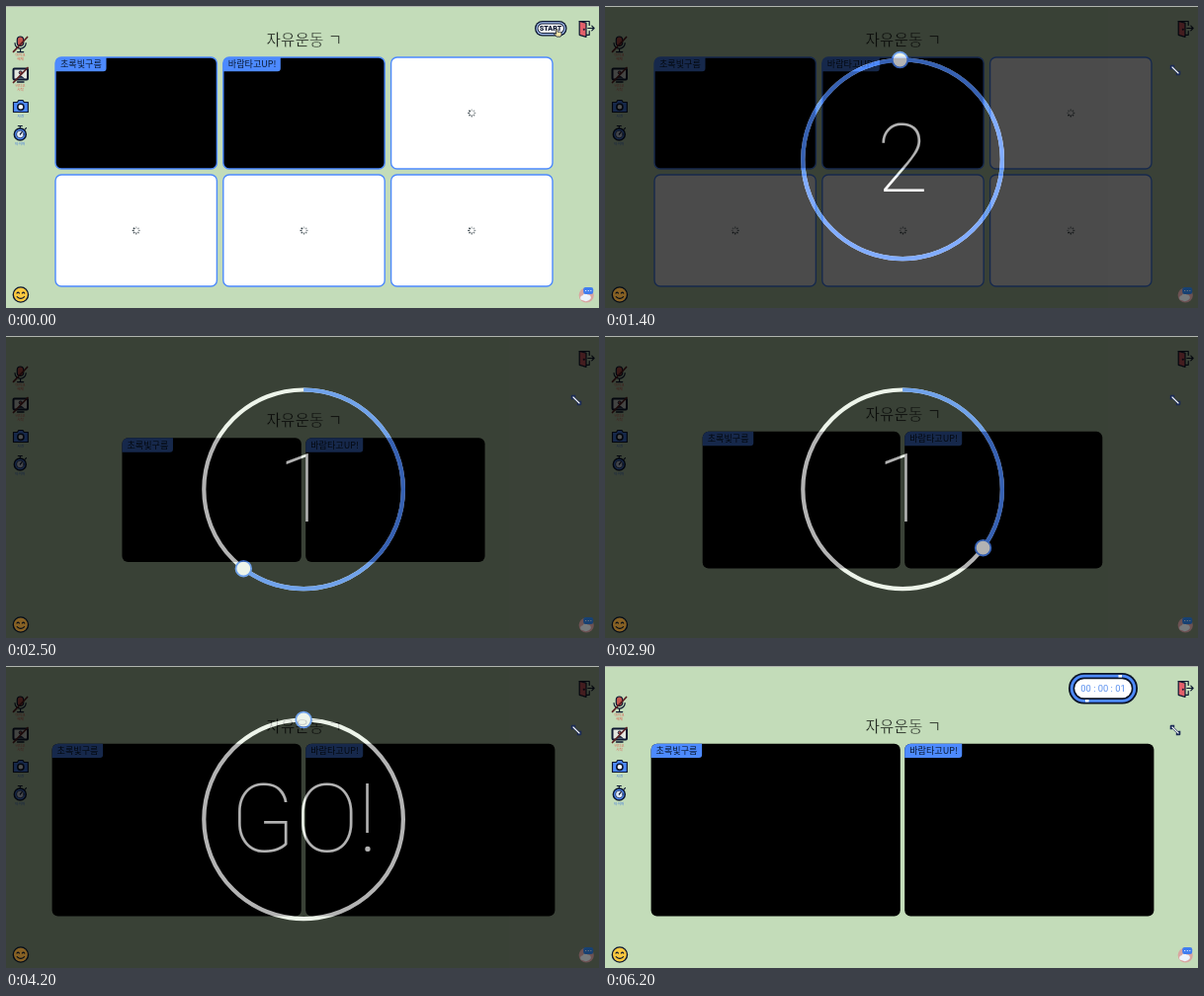
Animation, 600 px wide and 306 px high, one loop 6.3 s. Source, as an HTML page:

```html
<!DOCTYPE html>
<html lang="ko">
<head>
<meta charset="utf-8">
<title>자유운동</title>
<style>
  html, body { margin: 0; width: 100%; height: 100%; overflow: hidden; background: #c3dcb9; }
  svg { display: block; width: 100vw; height: 100vh; }
  text { font-family: "Noto Sans CJK KR", "Noto Sans KR", "Noto Sans CJK", sans-serif; }
  /* the background-coloured outline thins the strokes */
  #title { font-size: 15.7px; font-weight: 300; fill: #141a14; stroke: #c3dcb9; stroke-width: .4; }
  .tag { font-size: 9.1px; fill: #0a1a33; }
  .cap { font-size: 3.6px; text-anchor: middle; }
  #count { font: 100 95.5px Roboto, Inter, sans-serif; text-anchor: middle; fill: #fff; stroke: #fff; stroke-width: .15; }
  #clock { font: 400 9.4px Roboto, Inter, sans-serif; text-anchor: middle; fill: #5a90ee; }
  .start { font: 900 7.2px Roboto, Inter, sans-serif; text-anchor: middle; fill: #0c1730; }
  .ink { stroke: #0c1730; stroke-width: 1.2; stroke-linecap: round; stroke-linejoin: round; }
</style>
</head>
<body>
<svg viewBox="0 0 600 306" preserveAspectRatio="none">
  <rect width="600" height="306" fill="#c3dcb9"/>

  <g id="empty"></g>
  <g id="panels"></g>
  <text id="title" x="263.6">자유운동 ㄱ</text>

  <!-- side tools -->
  <g class="ink" fill="none">
    <rect x="11.3" y="31" width="6.4" height="9.5" rx="3.2" fill="#c4574f"/>
    <path d="M9 37.5a5.6 5.6 0 0 0 11.2 0M14.6 43.2V46.4M11.5 46.6H17.7"/>
    <path d="M7.5 46.3L21.6 31.5" stroke="#5a1f22" stroke-width="1.7"/>

    <rect x="7.5" y="63.5" width="14.5" height="11" rx="1" fill="#e3e6df" stroke-width="2"/>
    <path d="M11.5 77H18" stroke-width="1.4"/>
    <circle cx="14.8" cy="67.5" r="1.6" fill="#b3524b" stroke-width=".9"/>
    <path d="M11.5 73.5q3.3-5 6.6 0" fill="#33405f" stroke-width=".9"/>
    <path d="M7.5 77.5L22 62.5" stroke="#5a1f22" stroke-width="1.7"/>

    <path d="M7.5 97.5H11.5L12.8 95.5H17L18.3 97.5H22.3V107.5H7.5Z" fill="#4d8aff"/>
    <circle cx="14.9" cy="102.3" r="3.1" fill="#fff" stroke-width="1.6"/>

    <circle cx="14.3" cy="130" r="6" fill="#4d8aff" stroke-width="1.5"/>
    <circle cx="14.3" cy="130" r="3.7" fill="#dfeaff" stroke-width=".7"/>
    <path d="M14.3 130L16.3 127.6M14.3 123.6V121.8M12.3 121.5H16.3M19.3 124.8L20.5 123.6"/>
  </g>
  <g fill="#dd5d50">
    <text class="cap" x="14.5" y="51.2">마이크</text>
    <text class="cap" x="14.5" y="55.2">해제</text>
    <text class="cap" x="14.5" y="82">비디오</text>
    <text class="cap" x="14.5" y="86.3">시작</text>
  </g>
  <g fill="#3f78e0">
    <text class="cap" x="14.9" y="113">사진</text>
    <text class="cap" x="14.3" y="140.6">타이머</text>
  </g>

  <!-- exit door -->
  <g class="ink" fill="none">
    <path d="M580.2 15.5H590.2V19.5M590.2 25.5V29.3H586"/>
    <path d="M580.2 15.5L587 17.2V31.3L580.2 29.3Z" fill="#e2606a"/>
    <path d="M588.8 22.5H595M592.8 20.2L595.1 22.5L592.8 24.8"/>
    <circle cx="584.8" cy="23.8" r=".4"/>
  </g>

  <g id="start">
    <rect x="535" y="15" width="32.5" height="15.5" rx="7.7" fill="#0c1730"/>
    <rect x="536.3" y="16.3" width="29.9" height="12.9" rx="6.4" fill="#a9c4f5"/>
    <rect x="537.6" y="17.6" width="27.3" height="10.3" rx="5.1" fill="#0c1730"/>
    <rect x="538.5" y="18.5" width="25.5" height="8.5" rx="4.2" fill="#fff"/>
    <text class="start" x="551" y="25.4">START</text>
    <path class="ink" style="stroke-width:.8" fill="#f4e6a8"
      d="M556.4 23.6q.9-.9 1.7 0V26.2q2.8-.5 4 .9 .5 2.4-1 4H557.2L554.4 28q.2-1.2 2 0Z"/>
  </g>

  <g id="timer">
    <rect x="469" y="7" width="70" height="31.5" rx="15.7" fill="#0b1428"/>
    <rect x="472.2" y="10.2" width="63.6" height="25.1" rx="12.5" fill="none" stroke="#4d8aff" stroke-width="2.8"/>
    <rect x="475.2" y="13.2" width="57.6" height="19.1" rx="9.5" fill="#fff"/>
    <path d="M519.5 10.2H523M486 35.3H489.5" stroke="#fff" stroke-width="2.6"/>
    <text id="clock" x="504" y="25.6"></text>
  </g>

  <g id="overlay" opacity=".7">
    <rect width="600" height="306"/>
    <g fill="none" stroke-width="4.2">
      <circle cx="301.1" cy="155.3" r="100.8" stroke="#fff"/>
      <circle id="arc" cx="301.1" cy="155.3" r="100.8" stroke="#4d8aff" pathLength="360" transform="rotate(-90 301.1 155.3)"/>
    </g>
    <circle id="knob" r="7.8" fill="#fff" stroke="#4d8aff" stroke-width="1.8"/>
    <text id="count" x="301.2" y="188.2"></text>
  </g>
  <rect width="600" height="1" fill="#b0b5ae"/>

  <g id="corners">
    <g class="ink" fill="none">
      <circle cx="14.9" cy="292.5" r="7.6" fill="#fcc93f" stroke-width="1.4"/>
      <path d="M11 291q1.2-1.8 2.4 0M16.4 291q1.2-1.8 2.4 0M11.2 294.6q3.7 3.6 7.4 0"/>
    </g>
    <circle cx="587.2" cy="293" r="7.6" fill="#d9a5a0"/>
    <path d="M581.5 297.4q-1.4-3.4 2-4.2 1.8-3.4 5-.8 3.6.3 3.4 3.7-2 3.4-6 3Z" fill="#edf3fb"/>
    <rect x="584.2" y="285" width="10" height="7" rx="2.2" fill="#3f7df0"/>
    <path d="M586.6 288.5h.1M589.2 288.5h.1M591.8 288.5h.1" stroke="#fff" stroke-width="1.1" stroke-linecap="round"/>
  </g>

  <g id="cursor" fill="none" stroke-linejoin="round">
    <path d="M-3.4-3.4L3.4 3.4M-4.2-.8V-4.2H-.8M4.2 .8V4.2H.8" stroke="#1b2b55" stroke-width="2.2"/>
    <path d="M-3.4-3.4L3.4 3.4" stroke="#fff" stroke-width="1.3"/>
  </g>
</svg>
<script>
const LOOP = 6300, STEP = 100;
const OPEN = 300, CLOSE = 4300, REGROUP = 2200;
const TICKS = [1350, 2297, 3290];
const WORDS = ["3", "2", "1", "GO!"];
const NAMES = [["초록빛구름", 51.5], ["바람타고UP!", 58]];
const RING = { x: 301.1, y: 155.3, r: 100.8 };
const BLUE = "#4d8aff";

const $ = id => document.getElementById(id);
const show = (id, on) => $(id).setAttribute("display", on ? "inline" : "none");
const ease = (t, from, span) => {
  const x = Math.min(1, Math.max(0, (t - from) / span));
  return (1 - Math.cos(Math.PI * x)) / 2;
};

function set(el, attrs) {
  for (const k in attrs) el.setAttribute(k, attrs[k]);
}

function add(parent, tag, attrs, text) {
  const el = document.createElementNS("http://www.w3.org/2000/svg", tag);
  set(el, attrs);
  if (text) el.textContent = text;
  parent.appendChild(el);
  return el;
}

const cell = i => ({ x: 50 + (i % 3) * 169.8, y: 52 + (i > 2 ? 119 : 0), w: 163.4, h: 113 });

// waiting seats with spinners
const spinners = [2, 3, 4, 5].map(i => {
  const c = cell(i);
  add($("empty"), "rect", { x: c.x, y: c.y, width: c.w, height: c.h, rx: 6, fill: "#fff", stroke: BLUE, "stroke-width": 1.4 });
  const mid = add($("empty"), "g", { transform: `translate(${c.x + c.w / 2} ${c.y + c.h / 2})` });
  const wheel = add(mid, "g", {});
  for (let k = 0; k < 8; k++)
    add(wheel, "path", { d: "M0-2.1V-4", stroke: "#26333a", "stroke-width": 1.3, opacity: .35 + k * .09, transform: `rotate(${k * 45})` });
  return wheel;
});

const panels = NAMES.map(([name, w]) => {
  const box = add($("panels"), "rect", { rx: 6, "stroke-width": 1.4 });
  const label = add($("panels"), "g", {});
  add(label, "path", { d: `M0 14.3V6a6 6 0 0 1 6-6H${w}V11.3a3 3 0 0 1-3 3Z`, fill: BLUE });
  add(label, "text", { class: "tag", x: 5, y: 10.4 }, name);
  return { box, label };
});

function layout(t) {
  const grid = t < REGROUP;
  const w = 176.6 + 75.6 * ease(t, REGROUP, 1860), h = w * .693;
  const seats = grid ? [cell(0), cell(1)]
    : [301 - 2.2 - w, 301 + 2.2].map(x => ({ x, y: 166.2 - h / 2, w, h }));
  panels.forEach(({ box, label }, i) => {
    const { x, y, w, h } = seats[i];
    set(box, { x, y, width: w, height: h, stroke: grid ? BLUE : "none" });
    set(label, { transform: `translate(${x} ${y})` });
  });
  $("title").setAttribute("y", seats[0].y - 12.1);
  show("empty", grid);
  spinners.forEach(s => s.setAttribute("transform", `rotate(${t / STEP * 45})`));
}

function countdown(t) {
  const on = t >= OPEN && t < CLOSE;
  show("overlay", on);
  $("corners").style.filter = on ? "brightness(.5) hue-rotate(-8deg)" : "none";
  if (!on) return;
  const deg = TICKS.reduce((a, from) => a - 120 * ease(t, from, 705), 360);
  const a = deg * Math.PI / 180;
  $("arc").setAttribute("stroke-dasharray", deg > 359.9 ? "none" : `${deg} 400`);
  show("arc", deg > .1);
  set($("knob"), { cx: RING.x + RING.r * Math.sin(a), cy: RING.y - RING.r * Math.cos(a) });
  $("count").textContent = WORDS[TICKS.filter(from => t >= from).length];
}

function draw(t) {
  layout(t);
  countdown(t);
  show("start", t < OPEN);
  show("timer", t >= CLOSE);
  const sec = Math.max(0, Math.floor((t - CLOSE) / 1000));
  $("clock").textContent = `00 : 00 : 0${sec}`;
  const m = ease(t, 500, 250);
  show("cursor", t >= OPEN);
  $("cursor").setAttribute("transform", `translate(${557 + 20 * m} ${25.5 + 39.5 * m})`);
}

const begin = performance.now();
function tick() {
  const t = (performance.now() - begin) % LOOP;
  draw(Math.floor(t / STEP) * STEP);
  requestAnimationFrame(tick);
}
tick();
</script>
</body>
</html>
```
